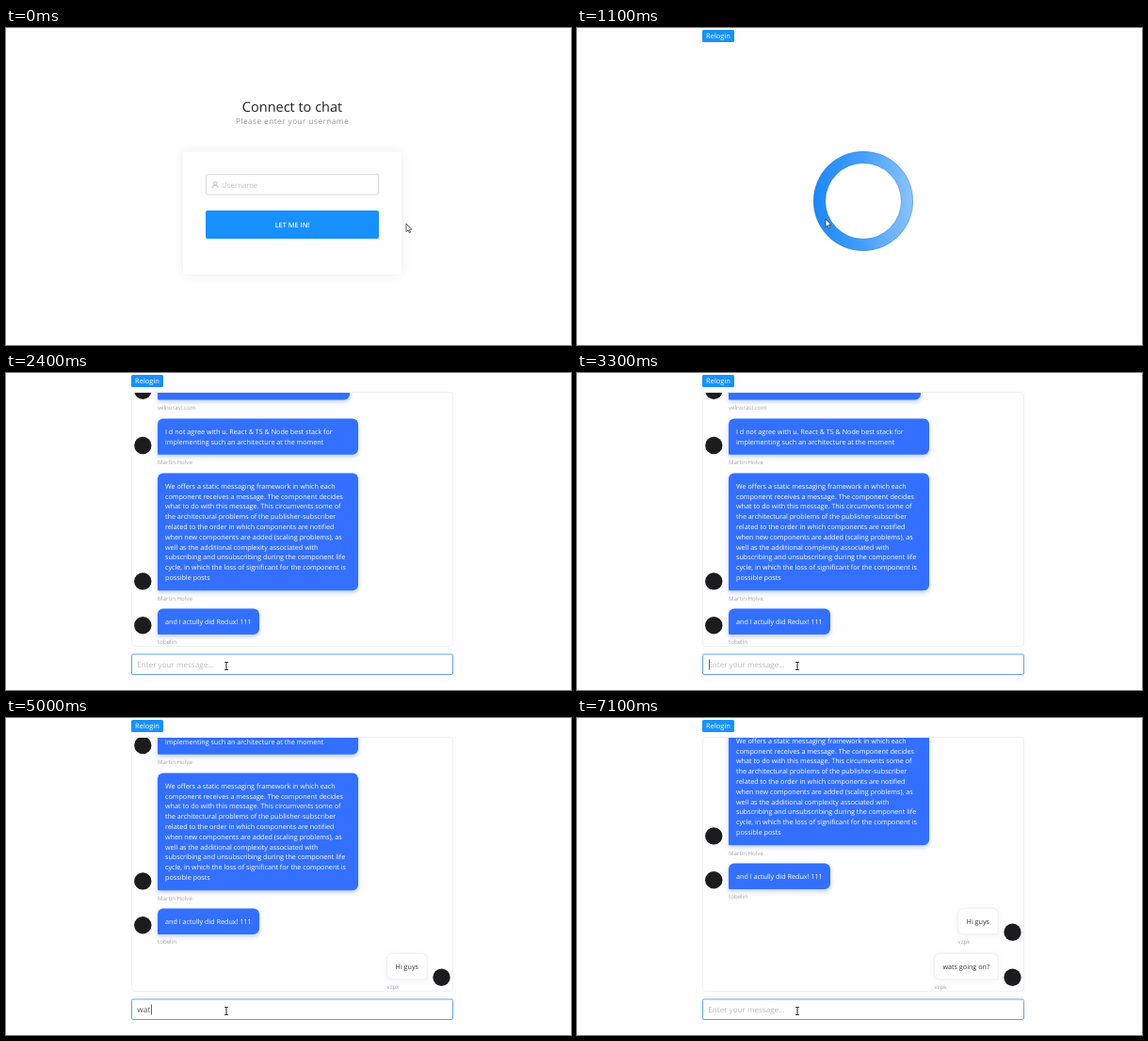
An HTML page with a canvas that plays this animation: 600x337 px, repeating every 7.3 s.

```html
<!DOCTYPE html>
<html lang="en">
<head>
<meta charset="utf-8">
<title>Chat demo</title>
<style>
html, body { margin: 0; width: 100%; height: 100%; overflow: hidden; background: #fefdff; }
canvas { display: block; width: 600px; height: 337px; }
</style>
</head>
<body>
<canvas id="stage" width="600" height="337"></canvas>
<script>
const ctx = document.getElementById('stage').getContext('2d');
const LOOP = 7300, STEP = 100;
const PAGE = '#fefdff', BLUE = '#1890ff', BUBBLE = '#3370ff', DARK = '#1c1c1e';
const MESSAGE_GAP = 48;

// Typed text as [time, value] pairs; the last one reached applies.
const LOGIN_TEXT = [[0, ''], [400, 'v'], [500, 'vzp'], [600, 'vzpk']];
const CHAT_TEXT = [
  [0, ''], [2600, 'H'], [2700, 'Hi'], [2800, 'Hi '], [3000, 'Hi g'], [3100, 'Hi guy'], [3200, 'Hi guys'],
  [3300, ''], [4400, 'w'], [4700, 'wa'], [5000, 'wat'], [5200, 'wats'], [5500, 'wats '], [5600, 'wats g'],
  [5700, 'wats go'], [5800, 'wats goi'], [5900, 'wats goin'], [6000, 'wats going'], [6100, 'wats going o'],
  [6200, 'wats going on'], [6300, 'wats going on?'], [6500, '']
];
const POINTER = [
  [0, 425, 208], [300, 265, 163], [600, 265, 163], [700, 264, 203],
  [1100, 264, 203], [1400, 262, 237], [1800, 262, 237], [2200, 234, 311]
];
const MESSAGES = [
  { top: 1, width: 204, author: 'velnorast.com', lines: [''] },
  { top: 48.5, width: 213, author: 'Martin Holve', lines: [
    'I d not agree with u. React & TS & Node best stack for',
    'implementing such an architecture at the moment'] },
  { top: 106.5, width: 213, author: 'Martin Holve', lines: [
    'We offers a static messaging framework in which each',
    'component receives a message. The component decides',
    'what to do with this message. This circumvents some of',
    'the architectural problems of the publisher-subscriber',
    'related to the order in which components are notified',
    'when new components are added (scaling problems), as',
    'well as the additional complexity associated with',
    'subscribing and unsubscribing during the component life',
    'cycle, in which the loss of significant for the component is',
    'possible posts'] },
  { top: 250.5, width: 108, author: 'tobelin', lines: ['and I actully did Redux! 111'] },
  { top: 298.2, own: true, author: 'vzpk', lines: ['Hi guys'] },
  { top: 346.2, own: true, author: 'vzpk', lines: ['wats going on?'] }
];

const clamp = v => Math.max(0, Math.min(1, v));
const easeInOut = v => v * v * (3 - 2 * v);
const lastReached = (list, t) => list.filter(item => item[0] <= t).pop();

function pointerAt(t) {
  const next = POINTER.findIndex(p => p[0] > t);
  if (next < 0) return POINTER[POINTER.length - 1].slice(1);
  const [t0, x0, y0] = POINTER[next - 1], [t1, x1, y1] = POINTER[next];
  const k = easeInOut((t - t0) / (t1 - t0));
  return [x0 + (x1 - x0) * k, y0 + (y1 - y0) * k];
}

function text(value, x, y, size, color, { align = 'left', weight = 400, spacing = 0 } = {}) {
  ctx.font = `${weight} ${size}px "Open Sans", "Noto Sans", sans-serif`;
  ctx.letterSpacing = spacing + 'px';
  ctx.textAlign = align;
  ctx.fillStyle = color;
  ctx.fillText(value, x, y);
  return ctx.measureText(value).width;
}

function box(x, y, w, h, radius, fill, stroke, shadow) {
  ctx.save();
  ctx.beginPath();
  ctx.roundRect(x, y, w, h, radius);
  if (shadow) [ctx.shadowColor, ctx.shadowBlur, ctx.shadowOffsetY] = shadow;
  ctx.fillStyle = fill;
  ctx.fill();
  ctx.shadowColor = 'transparent';
  if (stroke) {
    ctx.strokeStyle = stroke;
    ctx.lineWidth = 1;
    ctx.stroke();
  }
  ctx.restore();
}

function disc(x, y, r, fill) {
  ctx.beginPath();
  ctx.arc(x, y, r, 0, Math.PI * 2);
  ctx.fillStyle = fill;
  ctx.fill();
}

function caret(x, y, h) {
  ctx.fillStyle = '#444';
  ctx.fillRect(Math.round(x), y, 0.8, h);
}

function arrow(x, y) {
  const shape = [[0, 0], [0, 8.6], [2, 6.9], [3.4, 9.8], [4.6, 9.2], [3.3, 6.4], [5.8, 6.2]];
  ctx.beginPath();
  shape.forEach(([dx, dy]) => ctx.lineTo(x + dx, y + dy));
  ctx.closePath();
  ctx.fillStyle = '#fff';
  ctx.fill();
  ctx.strokeStyle = '#333';
  ctx.lineWidth = 0.8;
  ctx.stroke();
}

function beam(x, y) {
  ctx.fillStyle = '#222';
  ctx.fillRect(x - 0.5, y - 4, 1, 9);
  ctx.fillRect(x - 2, y - 4, 4, 0.8);
  ctx.fillRect(x - 2, y + 4.2, 4, 0.8);
}

function userIcon(x, y) {
  ctx.strokeStyle = '#aaa';
  ctx.lineWidth = 0.7;
  ctx.beginPath();
  ctx.arc(x, y - 1.3, 1.8, 0, Math.PI * 2);
  ctx.moveTo(x - 3, y + 3.5);
  ctx.quadraticCurveTo(x - 2.6, y + 0.7, x, y + 0.6);
  ctx.quadraticCurveTo(x + 2.6, y + 0.7, x + 3, y + 3.5);
  ctx.stroke();
}

function drawLogin(t) {
  const focused = t >= 300, typed = lastReached(LOGIN_TEXT, t)[1];
  text('Connect to chat', 304, 88.5, 14.5, '#222', { align: 'center' });
  text('Please enter your username', 304, 102, 8.2, '#999', { align: 'center', spacing: 0.48 });
  box(188, 131.5, 232, 130.5, 2, '#fff', null, ['rgba(0,0,0,.07)', 12, 0]);
  box(212.5, 155.5, 183, 21.5, 2, '#fff', focused ? '#40a9ff' : '#d9d9d9');
  userIcon(222.3, 166.5);
  const width = typed ? text(typed, 229, 170, 8, '#555') : (text('Username', 229, 170, 7.9, '#bfbfbf'), 0);
  if (focused) caret(229 + width, 162, 10);
  box(212, 194, 184, 30, 2, t >= 700 ? '#40a9ff' : BLUE);
  text('LET ME IN!', 304, 211.7, 7.3, '#fff', { align: 'center', weight: 600 });
}

function drawRelogin() {
  box(133, 2, 34, 13, 1.5, BLUE);
  text('Relogin', 150, 11.3, 7.5, '#fff', { align: 'center' });
}

function drawLoader(t) {
  const x = 304, y = 184, angle = (t - 1100) / 1000 * Math.PI * 2;
  const dx = 53 * Math.cos(angle), dy = 53 * Math.sin(angle);
  const shade = ctx.createLinearGradient(x - dx, y - dy, x + dx, y + dy);
  shade.addColorStop(0, '#1b88f8');
  shade.addColorStop(0.5, '#459ffa');
  shade.addColorStop(1, '#8cc3fb');
  disc(x, y, 53, shade);
  ctx.strokeStyle = 'rgba(70,120,180,.4)';
  ctx.lineWidth = 0.8;
  for (const r of [52.6, 40.4]) {
    ctx.beginPath();
    ctx.arc(x, y, r, 0, Math.PI * 2);
    ctx.stroke();
  }
  disc(x, y, 40, '#fff');
}

function drawMessage({ top, width, author, lines, own }, scroll) {
  const y = top - scroll, height = 27.5 + (lines.length - 1) * 10.8;
  if (y > 292 || y + height < 0) return;
  let left = 161;
  if (own) {
    ctx.font = '400 7.2px "Open Sans", "Noto Sans", sans-serif';
    ctx.letterSpacing = '0px';
    width = ctx.measureText(lines[0]).width + 18;
    left = 447 - width;
    box(left, y, width, height, [6, 6, 1, 6], '#fff', '#f1f0f3', ['rgba(0,0,0,.06)', 4, 1]);
  } else {
    box(left, y, width, height, [6, 6, 6, 1], BUBBLE, null, ['rgba(51,112,255,.35)', 4, 2]);
  }
  lines.forEach((line, i) =>
    text(line, left + (own ? 9 : 8), y + 16.3 + i * 10.8, 7.2, own ? '#333' : '#fff'));
  disc(own ? 462.5 : 145.3, y + height - (own ? 2 : 9.8), 9.2, DARK);
  text(author, left, y + height + 10.3, 6.15, '#a5a5a8');
}

function caretVisible(t, typedAt) {
  if (t < 2600) return t >= 2200 && t < 2400;
  return (t - typedAt) % 1000 < 500;
}

function drawChat(t) {
  const scroll = MESSAGE_GAP * (easeInOut(clamp((t - 3400) / 400)) + easeInOut(clamp((t - 6600) / 400)));
  box(133.5, 20.5, 341, 270, 3, PAGE, '#f1f0f3');
  ctx.save();
  ctx.beginPath();
  ctx.rect(133, 21, 342, 269.5);
  ctx.clip();
  MESSAGES.forEach(message => drawMessage(message, scroll));
  ctx.restore();

  const [typedAt, typed] = lastReached(CHAT_TEXT, t);
  box(133.5, 299, 341, 21.5, 1.5, '#fff', t >= 2200 ? '#62a5ee' : '#c4c4c6');
  const width = typed ? text(typed, 139.3, 313.2, 8.4, '#555')
    : (text('Enter your message...', 139.3, 313.2, 8.1, '#b9b9bb'), 0);
  if (caretVisible(t, typedAt)) caret(139.5 + width, 304.5, 11);
}

function draw(t) {
  ctx.fillStyle = PAGE;
  ctx.fillRect(0, 0, 600, 337);
  ctx.textRendering = 'geometricPrecision';
  if (t < 900) drawLogin(t);
  else {
    drawRelogin();
    if (t < 1400) drawLoader(t);
    else drawChat(t);
  }
  const [x, y] = pointerAt(t);
  const overField = (t >= 300 && t < 700) || t >= 2200;
  (overField ? beam : arrow)(x, y);
}

const start = performance.now();
function tick() {
  const t = (performance.now() - start) % LOOP;
  draw(Math.min(Math.floor(t / STEP) * STEP, LOOP - 200));
  requestAnimationFrame(tick);
}
tick();
</script>
</body>
</html>
```
